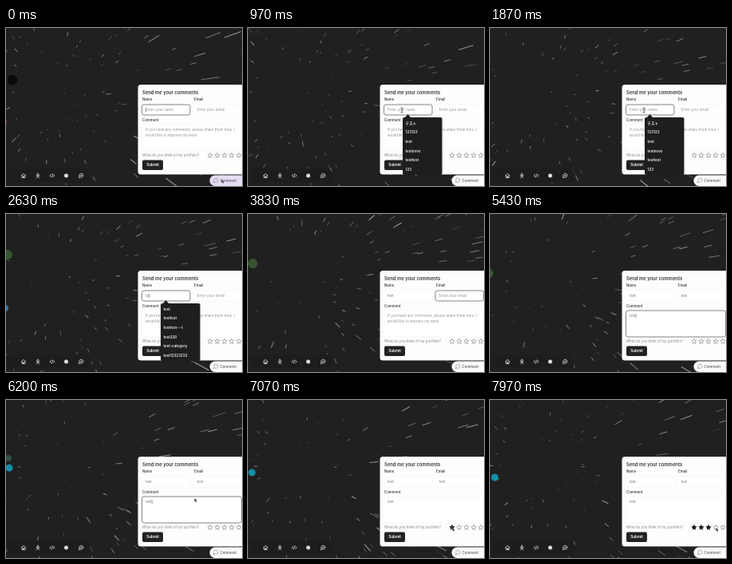
These frames come from a looping animation (296 by 198 pixels, 8 s). An HTML page with a canvas:

```html
<!DOCTYPE html>
<html lang="en">
<head>
<meta charset="utf-8">
<title>Comment form</title>
<style>
  html, body { margin: 0; width: 100%; height: 100%; overflow: hidden; background: #202020; }
  canvas { display: block; width: 296px; height: 198px; }
</style>
</head>
<body>
<canvas id="stage"></canvas>
<script>
const W = 296, H = 198, LOOP = 8000;
const canvas = document.getElementById('stage');
const ctx = canvas.getContext('2d');
const dpr = window.devicePixelRatio || 1;
canvas.width = W * dpr;
canvas.height = H * dpr;

const FONT = 'Inter, "Noto Sans CJK JP", "Noto Sans CJK", sans-serif';
const INK = '#333', MUTED = '#929292';

// Star field: depth decreases, so every star flies away from the vanishing point.
const CENTER = { x: 62, y: 88 };
let seed = 41;
function random() {
  seed = (seed * 16807) % 2147483647;
  return seed / 2147483647;
}
const stars = Array.from({ length: 270 }, () => ({
  x: random() * 310 - 68,
  y: random() * 210 - 94,
  z: random(),
  light: 0.4 + random() * 0.6
}));

function drawStars(t) {
  ctx.lineCap = 'butt';
  for (const s of stars) {
    const life = (s.z + t * 0.00011) % 1;
    const z = 1 - 0.68 * life;
    const near = z - 0.019, far = z + 0.019;
    const fade = Math.min(1, life * 8);
    ctx.strokeStyle = `rgba(200,203,200,${fade * s.light * (0.6 + 0.25 * life)})`;
    ctx.lineWidth = 0.8 + 0.3 * life;
    ctx.beginPath();
    ctx.moveTo(CENTER.x + s.x / far, CENTER.y + s.y / far);
    ctx.lineTo(CENTER.x + s.x / near, CENTER.y + s.y / near);
    ctx.stroke();
  }
}

// Piecewise linear path through [time, x, y] points.
function along(points, t) {
  for (let i = 1; i < points.length; i++) {
    const [t0, x0, y0] = points[i - 1], [t1, x1, y1] = points[i];
    if (t <= t1) {
      const k = Math.max(0, (t - t0) / (t1 - t0));
      return [x0 + (x1 - x0) * k, y0 + (y1 - y0) * k];
    }
  }
  return points[points.length - 1].slice(1);
}

const badges = [
  { color: '#0b0b0b', r: 6.5, path: [[0, 8, 65], [900, -10, 72]] },
  { color: '#b3263c', r: 4, path: [[0, -3, 118], [500, -8, 122]] },
  { color: '#2878b5', r: 4, path: [[1900, -8, 112], [2630, -1, 118], [3300, -8, 124]] },
  { color: '#35572f', r: 6, path: [[1700, -9, 42], [2630, 2, 51], [3830, 6, 62], [4670, 6, 68], [6000, -8, 79]] },
  { color: '#2f5145', r: 4, path: [[5400, -6, 67], [6200, 3, 73], [7000, -6, 79]] },
  { color: '#1690a8', r: 4.5, path: [[5200, -8, 77], [6200, 4, 85], [7970, 6, 97], [8000, 6, 97]] }
];

function disc(x, y, r, color) {
  ctx.fillStyle = color;
  ctx.beginPath();
  ctx.arc(x, y, r, 0, Math.PI * 2);
  ctx.fill();
}

function box(x, y, w, h, r, fill, stroke, width = 1) {
  ctx.beginPath();
  ctx.roundRect(x, y, w, h, r);
  if (fill) { ctx.fillStyle = fill; ctx.fill(); }
  if (stroke) { ctx.strokeStyle = stroke; ctx.lineWidth = width; ctx.stroke(); }
}

function text(str, x, y, size, color, weight = 400) {
  ctx.font = `${weight} ${size}px ${FONT}`;
  ctx.fillStyle = color;
  ctx.fillText(str, x, y);
}

function strokePath(d, x, y, color, width = 0.8) {
  ctx.save();
  ctx.translate(x, y);
  ctx.strokeStyle = color;
  ctx.lineWidth = width;
  ctx.lineJoin = ctx.lineCap = 'round';
  ctx.stroke(new Path2D(d));
  ctx.restore();
}

const BUBBLE = 'M-2.5 2.5L-2 1A2.6 2.5 0 1 1 -.8 2.1Z';

function drawDock() {
  box(2, 176, 103, 18, 6, '#1d1d1d');
  const white = '#dcdcdc';
  strokePath('M-2.7 0L0-2.6L2.7 0M-2-.5V2.6H2V-.5M-.5 2.6V.8H.5V2.6', 22, 185, white);
  strokePath('M0-2.8A1.1 1.1 0 1 1-.01-2.8M-2 0H2M0-.5V.8L-1.7 2.9M0 .8L1.7 2.9', 40, 185, white);
  strokePath('M-1.6-1.5L-3 0L-1.6 1.5M1.6-1.5L3 0L1.6 1.5M.5-2L-.5 2', 58, 185, white);
  disc(75.5, 185, 2.5, white);
  strokePath(BUBBLE, 94, 185, white);
  strokePath('M-.8-.6H1.6M-.8.6H1', 94, 185, white, 0.6);
}

function typed(t, start, step) {
  return 'test'.slice(0, Math.max(0, Math.floor((t - start) / step) + 1));
}

function field(x, y, w, h, value, hints, focused, t) {
  box(x, y, w, h, 2.5, '#fff', focused ? '#777' : '#f4f4f4', focused ? 0.9 : 0.6);
  const ty = y + 8.2;
  if (value) text(value, x + 4.6, ty, 4.4, '#777');
  else hints.forEach((line, i) => text(line, x + 4.6, ty + i * 6.7, 4.5, MUTED));
  if (focused && t % 1000 < 650) {
    ctx.font = `400 4.4px ${FONT}`;
    ctx.fillStyle = '#666';
    ctx.fillRect(x + 4.6 + ctx.measureText(value).width, ty - 4.3, 0.6, 5.3);
  }
}

function star(x, y, filled) {
  ctx.beginPath();
  for (let i = 0; i < 10; i++) {
    const a = -Math.PI / 2 + i * Math.PI / 5, r = i % 2 ? 1.5 : 3.3;
    ctx.lineTo(x + r * Math.cos(a), y + r * Math.sin(a));
  }
  ctx.closePath();
  ctx.lineJoin = 'round';
  ctx.lineWidth = 0.6;
  ctx.strokeStyle = ctx.fillStyle = filled ? '#111' : '#808080';
  if (filled) ctx.fill();
  ctx.stroke();
}

function drawForm(t) {
  const focus = t < 3450 ? 'name' : t < 4500 ? 'email' : t < 7050 ? 'comment' : '';
  box(165.5, 71, 140, 112.5, 3.5, '#fdfdfd');
  text('Send me your comments', 171, 83, 5.85, INK, 600);
  text('Name', 171, 91.2, 4.4, INK, 500);
  text('Email', 236, 91.2, 4.4, INK, 500);
  text('Comment', 171, 116.7, 4.4, INK, 500);
  field(170.5, 96, 60.5, 13, typed(t, 2250, 230), ['Enter your name'], focus === 'name', t);
  field(235, 96, 60.5, 13, typed(t, 3980, 110), ['Enter your email'], focus === 'email', t);
  field(170.5, 121, 125, 33, typed(t, 4950, 140),
    ['If you have any comments, please share them here. I', 'would like to improve my work.'],
    focus === 'comment', t);
  text('What do you think of my portfolio?', 171, 161, 4.4, '#858585');
  const rating = t < 7050 ? 0 : t < 7250 ? 1 : t < 7450 ? 2 : 3;
  for (let i = 0; i < 5; i++) star(256 + i * 9, 159.7, i < rating);
  box(171, 165.5, 26, 12.5, 2, '#222');
  text('Submit', 176.3, 173.4, 4.6, '#fff', 600);
}

function drawSuggestions(t) {
  if (t < 700 || t > 3200) return;
  const items = t < 2250
    ? ['テスト', '123123', 'test', 'testnovo', 'testtest', '123']
    : ['test', 'testtest', 'testtest---t', 'test220', 'test-category', 'test12323232'];
  ctx.fillStyle = '#1e1e1e';
  ctx.beginPath();
  ctx.moveTo(196.5, 112.5);
  ctx.lineTo(200.5, 108);
  ctx.lineTo(204.5, 112.5);
  ctx.fill();
  box(194, 112, 49.5, 72, 2, '#1e1e1e');
  items.forEach((item, i) => text(item, 197.5, 120.7 + i * 11.6, 4.5, '#eee', 600));
}

function drawCommentButton(t) {
  box(255.5, 184.5, 48, 13.5, 6.7, t < 250 ? '#e6dcf2' : '#fcf9fd');
  strokePath(BUBBLE, 263, 191, '#777', 0.6);
  text('Comment', 268.5, 192.7, 4.4, '#555', 500);
}

const pointer = [
  [0, 271, 191], [150, 268, 187], [650, 193, 103], [2250, 193, 103]
];
const pointerBack = [
  [5850, 205, 116], [6200, 237, 124], [6800, 254, 158], [7100, 257, 161],
  [7350, 266, 161], [7600, 275, 161], [7900, 284, 161], [8000, 284, 161]
];

function drawPointer(t) {
  if (t > 2250 && t < 5850) return;
  const [x, y] = along(t < 3000 ? pointer : pointerBack, t);
  if (t > 600 && t < 3000) {
    strokePath('M-1.2-3.2Q0-3.2 0-2Q0-3.2 1.2-3.2M0-2V2M-1.2 3.2Q0 3.2 0 2Q0 3.2 1.2 3.2', x, y, '#444', 0.7);
    return;
  }
  ctx.save();
  ctx.translate(x - 0.5, y - 1);
  const arrow = new Path2D('M0 0V4.4L1.1 3.4L1.9 5.1L2.6 4.8L1.9 3.1H3.2Z');
  ctx.fillStyle = '#333';
  ctx.strokeStyle = '#fff';
  ctx.lineWidth = 0.7;
  ctx.stroke(arrow);
  ctx.fill(arrow);
  ctx.restore();
}

function draw(t) {
  ctx.setTransform(dpr, 0, 0, dpr, 0, 0);
  ctx.fillStyle = '#202020';
  ctx.fillRect(0, 0, W, H);
  drawStars(t);
  for (const b of badges) {
    const [x, y] = along(b.path, t);
    disc(x, y, b.r, b.color);
  }
  drawDock();
  drawForm(t);
  drawSuggestions(t);
  drawCommentButton(t);
  drawPointer(t);
}

const begin = performance.now();
function tick() {
  draw((performance.now() - begin) % LOOP);
  requestAnimationFrame(tick);
}
tick();
</script>
</body>
</html>
```
